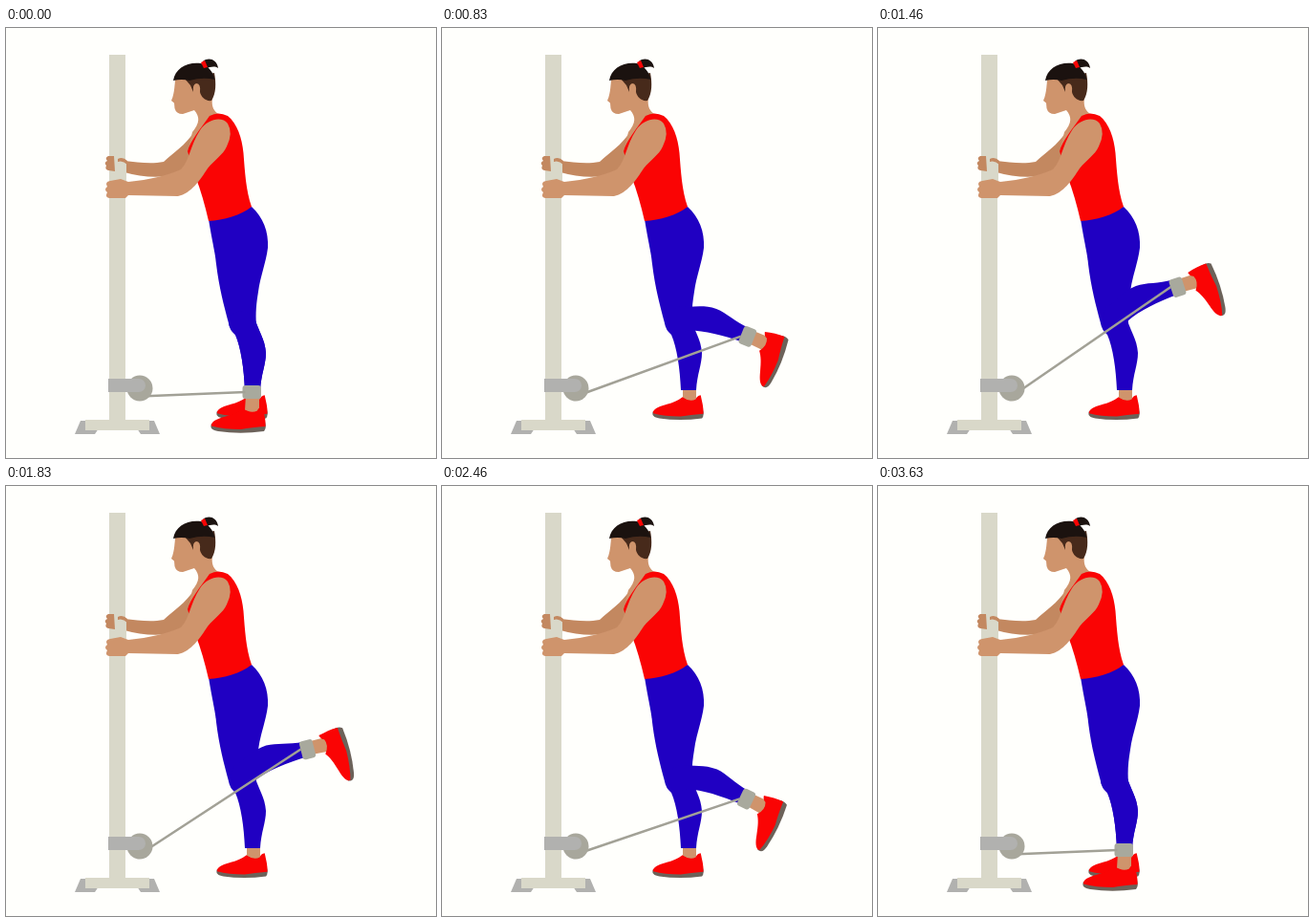
An HTML page that plays this animation: 450 px wide and 450 px high, repeating every 3680 ms.

```html
<!DOCTYPE html>
<html lang="en">
<head>
<meta charset="utf-8">
<title>Standing cable leg curl</title>
<style>
  html, body { margin: 0; width: 100%; height: 100%; overflow: hidden; background: #fffffc; }
  svg { display: block; width: 100vw; height: 100vh; }
  .pole { fill: #d9d8c9; }
  .steel { fill: #b1b1af; }
  .skin { fill: #cf946c; }
  .shade { fill: #c38860; }
  .hair { fill: #1b120f; }
  .side { fill: #472a1b; }
  .red { fill: #fa0404; }
  .blue { fill: #2000c2; }
  .sole { fill: #6c6259; }
  .cuff { fill: #a8a99d; }
  .cable { stroke: #a2a196; stroke-width: 2.5; }
</style>
</head>
<body>
<svg viewBox="0 0 450 450">
  <defs>
    <g id="shoe">
      <path class="sole" d="M215 414C213 419 216 421 222 422Q245 425.500 270 422Q273 418 271 412Z"/>
      <path class="red" d="M248 398Q256 404 263 400.500Q264 397 268.500 396C270 403 272 410 271.500 417Q257 418 246 420Q228 420 215 416.500C214 412 221 409 228 407C238 404 243 402 248 398Z"/>
    </g>
    <path id="shin" class="blue" d="M233 309Q234 316 240 321C246 335 249 356 250 379L266 379C267 362 272 352 272 340C271 325 264 317 260 303Q247 291 236 300Z"/>
  </defs>

  <!-- far arm -->
  <path class="shade" d="M196 110C188 122 176 130 165 140C150 143 137 140 124 139L124 151C140 156 160 157 176 154L200 146Z"/>

  <!-- machine -->
  <path class="steel" d="M78 411L72 425H93L97 419H137L141 425H161L155 411Z"/>
  <path class="pole" d="M108 28H125V410H150V421H83V410H108Z"/>
  <path class="pole" d="M113 138H126V160H113Z"/>
  <path class="shade" d="M113 134H107Q103 136 106 139Q102 141 105 144Q103 148 107 149L114 150Z"/>
  <path class="shade" d="M117 137Q122 134 127 139L127 143Q122 138 117 140Z"/>

  <!-- head and neck -->
  <path class="skin" d="M178 50C176 58 177 67 173 76L176 78.500L176.500 84Q178 90 185 90L197 86C203 93 203 99 195 109L190 130L215 122L228 93C216 88 215 82 216 72L210 48Z"/>
  <path class="side" d="M187 53L218 47C220 58 220 68 215 76C209 77 204 72 203 67Q204 58 199 58Q195 59 196 67L193 60Z"/>
  <path class="hair" d="M175 55C177 42 190 35 204 37C212 40 217 46 218.500 54Q206 51 192 55Q184 53 175 55Z"/>
  <path class="hair" d="M206 35C212 30 221 33 222 42C218 39 214 41 209 42Z"/>
  <path class="red" d="M204 36L208 34L211 41L207 42Z"/>

  <!-- standing leg -->
  <path class="skin" d="M252 374H266V392L262 397L252 393Z"/>
  <use href="#shoe" transform="translate(21 16) scale(.93)"/>
  <use href="#shin"/>
  <path class="blue" d="M212 200C216 225 219 235 220 247C223 272 228 290 233 309L241 321L262 311C261 298 262 288 264 276C266 260 272 246 274 230C275 213 269 198 257 187Z"/>

  <!-- torso and near arm -->
  <path class="red" d="M213 92Q222 87 232 92C242 100 247 115 248.500 131C250 150 251 170 257 187C246 196 228 201 212 202C208 185 204 170 198 155L190 129C193 118 203 106 213 92Z"/>
  <path class="skin" d="M203 107C211 95 226 92 232 100Q238 110 231 124C227 133 218 138 211 147C203 159 194 173 180 176L128 175L125 178H108Q103 177 106 172Q102 169 106 166Q103 161 109 160L120 158L128 161C150 159 170 154 183 148C192 139 193 122 203 107Z"/>

  <!-- moving leg, cable and pulley -->
  <g class="leg">
    <path class="skin" d="M251 384H265V400Q262 405 257 405L250 400Z"/>
    <use href="#shoe"/>
    <use href="#shin"/>
    <rect class="cuff" x="247.500" y="374" width="19.500" height="14" rx="3"/>
  </g>
  <line class="cable" x1="140" y1="385.500"/>
  <circle cx="140" cy="377" r="13.500" fill="#a8a79c"/>
  <path class="steel" d="M107 367H139A7 7 0 0 1 139 381H107Z"/>
</svg>
<script>
  const LOOP = 3680, PEAK = 108;
  const UP = [0, 1450], DOWN = [1550, 3590];
  const knee = { x: 245.5, y: 305.7 };
  const cuff = { x: 257.5 - knee.x, y: 381 - knee.y };
  const HOOK = 7; // the cable meets the cuff this far left of its centre
  const leg = document.querySelector('.leg');
  const cable = document.querySelector('.cable');
  const start = performance.now();

  // cubic-bezier(.45, 0, .55, 1), solved by bisection
  function ease(x) {
    let lo = 0, hi = 1;
    for (let i = 0; i < 24; i++) {
      const u = (lo + hi) / 2, v = 1 - u;
      if (1.35 * u * v * v + 1.65 * u * u * v + u * u * u < x) lo = u;
      else hi = u;
    }
    return lo * lo * (3 - 2 * lo);
  }

  const ramp = (t, [a, b]) => ease(Math.min(1, Math.max(0, (t - a) / (b - a))));

  function draw() {
    const t = (performance.now() - start) % LOOP;
    const angle = PEAK * (ramp(t, UP) - ramp(t, DOWN));
    const rad = angle * Math.PI / 180, c = Math.cos(rad), s = Math.sin(rad);
    leg.setAttribute('transform', `rotate(${-angle} ${knee.x} ${knee.y})`);
    cable.setAttribute('x2', knee.x + cuff.x * c + cuff.y * s - HOOK);
    cable.setAttribute('y2', knee.y - cuff.x * s + cuff.y * c);
    requestAnimationFrame(draw);
  }
  draw();
</script>
</body>
</html>
```
